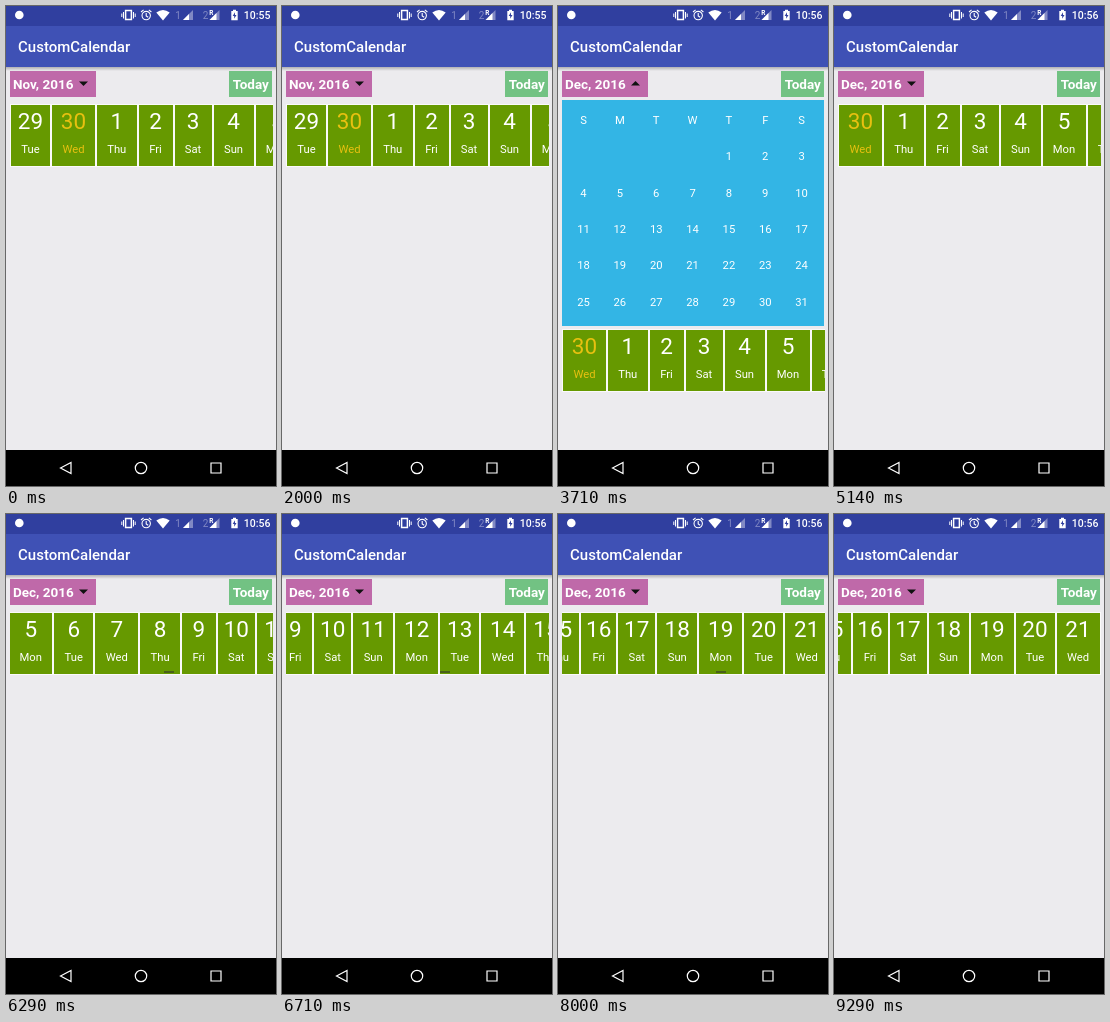
These frames come from a looping animation (270 px wide and 480 px high, 9.44 s). An HTML page with a canvas:

```html
<!DOCTYPE html>
<html lang="en">
<head>
<meta charset="utf-8">
<title>CustomCalendar</title>
<style>
  html, body { margin: 0; width: 100%; height: 100%; overflow: hidden; background: #000; }
  canvas { display: block; }
</style>
</head>
<body>
<canvas id="stage" width="270" height="480"></canvas>
<script>
const ctx = document.getElementById('stage').getContext('2d');
const LOOP = 9440, FPS = 7;
const GREEN = '#669900', TODAY = '#e8c010', FAINT = '#8189c4';
const DAYS = ['Sun', 'Mon', 'Tue', 'Wed', 'Thu', 'Fri', 'Sat'];
const CELL_WIDTH = [42, 45, 41, 45, 41.5, 36, 39];

function rect(x, y, w, h, color) {
  ctx.fillStyle = color;
  ctx.fillRect(x, y, w, h);
}

function text(str, x, y, size, { color = '#fff', weight = 400, align = 'center' } = {}) {
  ctx.font = `${weight} ${size}px Roboto, sans-serif`;
  ctx.textAlign = align;
  ctx.fillStyle = color;
  ctx.fillText(str, x, y);
}

function shape(d, color = '#fff') {
  ctx.fillStyle = color;
  ctx.fill(new Path2D(d));
}

function outline(d, width = 1.2, color = '#fff') {
  ctx.strokeStyle = color;
  ctx.lineWidth = width;
  ctx.stroke(new Path2D(d));
}

function clipped(x, y, w, h, draw) {
  ctx.save();
  ctx.beginPath();
  ctx.rect(x, y, w, h);
  ctx.clip();
  draw();
  ctx.restore();
}

// Decelerating progress from step a to step b
function easeOut(step, a, b) {
  const u = Math.min(1, Math.max(0, (step - a) / (b - a)));
  return 1 - (1 - u) ** 2;
}

function statusBar(clock) {
  rect(0, 0, 270, 20, '#303f9f');
  shape('M9 9a4.3 4.3 0 1 0 8.6 0a4.3 4.3 0 1 0 -8.6 0z');
  // vibrate
  outline('M119.6 4.6h5.8v9h-5.8z', 1.5);
  outline('M117.5 6v6.5M127.5 6v6.5M115.8 7.5v3.5M129.2 7.5v3.5', 1);
  // alarm
  outline('M136 9.6a4.2 4.2 0 1 0 8.4 0a4.2 4.2 0 1 0 -8.4 0M140.2 7v3l2 1.2M135 6l2.6 -2.2M145.4 6l-2.6 -2.2', 1.1);
  // wifi
  shape('M150.3 6.6Q157 1.6 163.7 6.6L157 14.4z');
  // mobile signals
  text('1', 172, 13, 10, { color: FAINT });
  shape('M177 14L187 4V14z', FAINT);
  shape('M177 14L183 8V14z');
  text('2', 199.5, 13, 10, { color: FAINT });
  text('R', 205.3, 8.5, 6.5, { weight: 700 });
  shape('M203.5 14L213.5 4V14z', FAINT);
  shape('M203.5 14L210.5 7V14z');
  // battery
  shape('M225.3 5h1.7v-1.2h3V5h1.7v9.2h-6.4z');
  shape('M229 6.2l-2.3 3.8h1.5v2.8l2.3 -3.8h-1.5z', '#303f9f');
  text(clock, 264.5, 13, 10.5, { weight: 500, align: 'right' });
}

function toolbar() {
  const shadow = ctx.createLinearGradient(0, 61, 0, 65);
  shadow.addColorStop(0, 'rgba(0,0,0,.25)');
  shadow.addColorStop(1, 'rgba(0,0,0,0)');
  rect(0, 61, 270, 4, shadow);
  rect(0, 20, 270, 41, '#3f51b5');
  text('CustomCalendar', 12, 46, 15, { weight: 500, align: 'left' });
}

function buttons(month, open) {
  rect(4, 65, 86, 26, '#bf69a9');
  text(`${month}, 2016`, 7, 83, 13.5, { weight: 700, align: 'left' });
  shape(open ? 'M73 79.5h9l-4.5 -4.5z' : 'M73 75.5h9l-4.5 4.5z', '#111');
  rect(223, 65, 43, 26, '#72c283');
  text('Today', 244.8, 83, 13.5, { weight: 700 });
}

function monthPage(left, firstColumn, length, today) {
  const put = (str, col, row, color) =>
    text(str, left + 25.5 + col * 36.35, 118 + row * 36.3, 11.25, { color });
  DAYS.forEach((day, col) => put(day[0], col, 0));
  for (let d = 1; d <= length; d++) {
    const slot = d - 1 + firstColumn;
    put(d, slot % 7, 1 + Math.floor(slot / 7), d === today ? TODAY : '#fff');
  }
}

function monthPanel(swipe) {
  rect(4, 94, 262, 226, '#33b5e5');
  clipped(4, 94, 262, 226, () => {
    if (swipe < 1) monthPage(-262 * swipe, 2, 30, 30);
    if (swipe > 0) monthPage(262 * (1 - swipe), 4, 31);
  });
}

function dayStrip(top, scroll, showThumb) {
  clipped(4, top - 1, 263, 63, () => {
    rect(4, top - 1, 263, 63, '#fafafa');
    let x = 5 - scroll;
    for (let i = 0; x < 267; i++) {
      const date = new Date(2016, 10, 29 + i);
      const day = date.getDay(), num = date.getDate();
      const width = CELL_WIDTH[day] + (day === 5 && num > 9 ? 1 : 0);
      if (x + width > 4) {
        const left = Math.round(x), right = Math.round(x + width) - 2;
        const mid = x + width / 2 - 1;
        const color = i === 1 ? TODAY : '#fff';
        rect(left, top, right - left, 61, GREEN);
        text(num, mid, top + 24, 22.5, { color });
        text(DAYS[day], mid, top + 48, 11.25, { color });
      }
      x += width;
    }
    if (showThumb) rect(158, top + 58, 10, 2, 'rgba(50,50,50,.55)');
  });
}

function navBar() {
  rect(0, 444, 270, 36, '#000');
  outline('M54.5 462L65 456.5V467.5z');
  outline('M129.3 462a5.7 5.7 0 1 0 11.4 0a5.7 5.7 0 1 0 -11.4 0');
  outline('M205 457h10v10h-10z');
}

function draw(step) {
  const open = step >= 16 && step < 36;
  const december = step >= 24;
  const flings = 419 * easeOut(step, 42, 49) + 233 * easeOut(step, 50, 57);
  rect(0, 0, 270, 480, '#ecebee');
  toolbar();
  statusBar(step < 21 ? '10:55' : '10:56');
  buttons(december ? 'Dec' : 'Nov', open);
  if (open) monthPanel(easeOut(step, 22, 26));
  dayStrip(open ? 324 : 99, (december ? 41 : 0) + flings, step >= 43 && step < 59);
  navBar();
}

function tick() {
  const t = performance.now() % LOOP;
  draw(Math.floor((t + 5) * FPS / 1000));
  requestAnimationFrame(tick);
}
tick();
</script>
</body>
</html>
```
